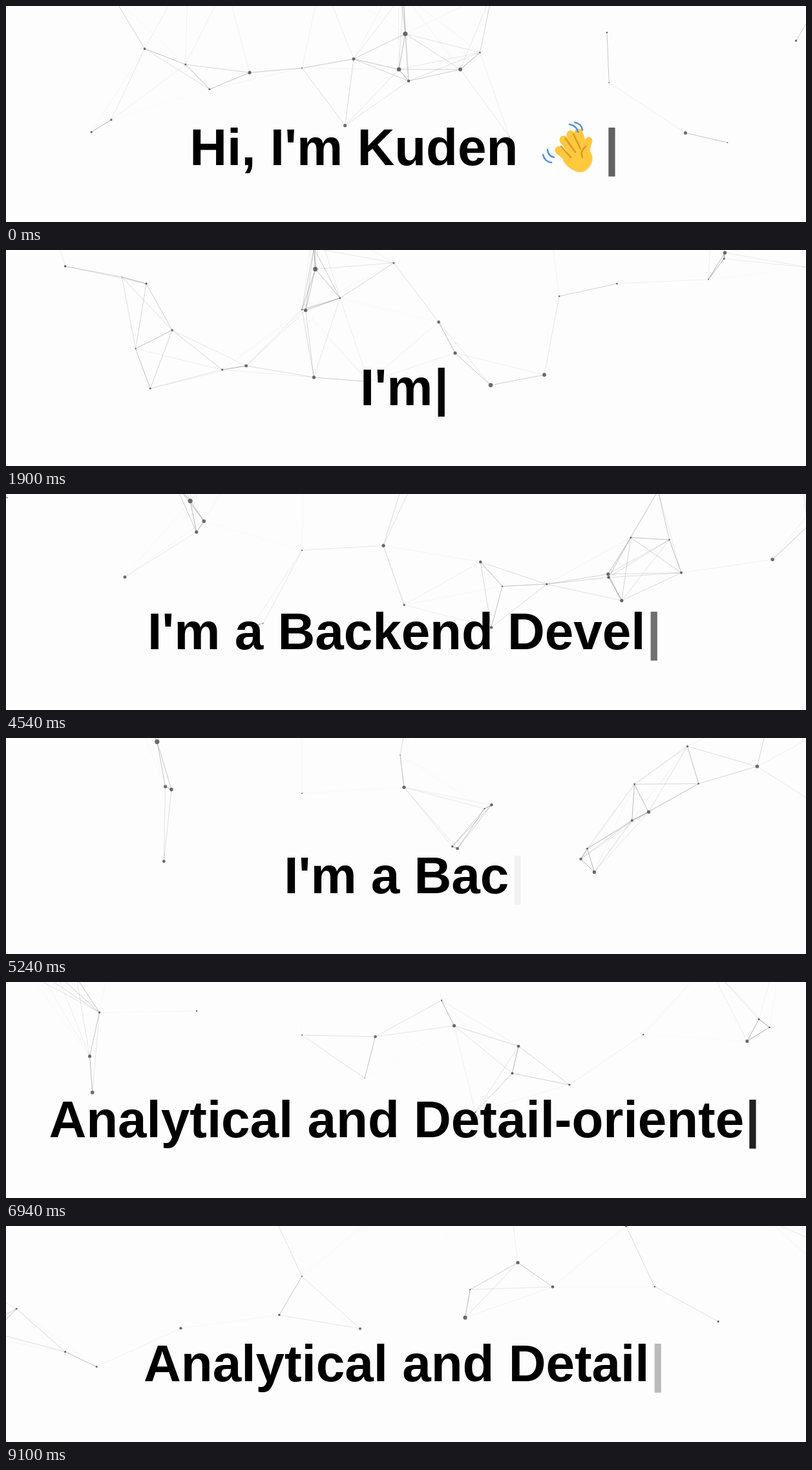
Animation, 1238 px wide and 334 px high, one loop 9.13 s. Source, as an HTML page with a canvas:

```html
<!DOCTYPE html>
<html lang="en">
<head>
<meta charset="utf-8">
<title>Typed intro</title>
<style>
  html, body { margin: 0; width: 100%; height: 100%; overflow: hidden; background: #fdfdfd; }
  canvas { position: absolute; left: 0; top: 0; }
  #line {
    position: absolute; left: 0; top: 167px; width: 1233px;
    text-align: center; white-space: pre; color: #000;
    font: 700 80px/92px "Liberation Sans", Arial, sans-serif;
  }
  #line.tall { top: 173px; }
  #cursor { margin-left: 2px; }
  .emoji { display: none; position: relative; width: 109.8px; height: 0; }
  .emoji.on { display: inline-block; }
  .emoji svg { position: absolute; left: 0; top: -72px; }
</style>
</head>
<body>
<canvas id="net" width="1238" height="262"></canvas>
<div id="line"><span id="text"></span><span class="emoji" id="wave"><svg width="110" height="90" fill="none" stroke-linecap="round">
  <g stroke="#ffc83d" stroke-width="13">
    <path d="M42 49L64 68M49 33L68 58M60 25L76 54M72 22L82 52"/>
    <path d="M88 34Q83 46 84 62" stroke-width="11"/>
  </g>
  <path d="M53 60Q66 42 84 46Q96 54 93 66Q88 83 73 83Q57 80 48 65Z" fill="#ffc83d"/>
  <g stroke="#d99a2b" stroke-width="2.6">
    <path d="M45 43L60 60M52 31L67 52M64 24L75 47"/>
    <path d="M83 43Q74 51 78 60"/>
  </g>
  <g stroke="#5590ea" stroke-width="2.6">
    <path d="M58 9Q69 11 71 21M66 6Q77 8 78 18"/>
    <path d="M24 48Q25 58 34 60M17 56Q20 67 30 68"/>
  </g>
</svg></span><span class="emoji" id="coder"><svg width="110" height="90">
  <rect x="38" y="10" width="34" height="38" rx="15" fill="#ffc83d"/>
  <path d="M35 25Q34 15 41 10Q46 4 57 5Q68 5 71 11Q76 16 73 25L69 20Q62 15 54 18Q45 19 40 20Z" fill="#f79b34"/>
  <path d="M44 23Q47 20 50 22M60 22Q63 20 66 23" fill="none" stroke="#b5651d" stroke-width="2"/>
  <circle cx="47.5" cy="28" r="2.2" fill="#4a3b30"/>
  <circle cx="62.5" cy="28" r="2.2" fill="#4a3b30"/>
  <path d="M49 36Q55 38 61 36Q59 42 55 42Q51 42 49 36Z" fill="#c4302b"/>
  <path d="M15 83Q15 72 26 72V83ZM94 83Q94 72 83 72V83Z" fill="#ffc83d"/>
  <rect x="23.5" y="44" width="62" height="39" rx="3" fill="#929292"/>
  <rect x="50.5" y="59" width="8" height="8" fill="#454552"/>
</svg></span><span id="cursor">|</span></div>
<script>
const LOOP = 9130, TYPE = 33, ERASE = 70, REACH = 165;
const $ = id => document.getElementById(id);
const ctx = $("net").getContext("2d");

// start: first key press, erase: end of the pause
const words = [
  { text: "Hi, I'm Kuden ", emoji: "wave", start: -2000, erase: 650 },
  { text: "I'm a Backend Developer ", emoji: "coder", start: 1791, erase: 4116 },
  { text: "Analytical and Detail-oriented", start: 5966, erase: 8456 }
];

let seed = 11;
const rand = () => (seed = (seed * 16807) % 2147483647) / 2147483647;
const spread = (from, to) => from + rand() * (to - from);
const wrap = (v, from, to) => from + (((v - from) % (to - from)) + to - from) % (to - from);

// the field reaches past the stage on three sides
const field = { left: -100, right: 1340, top: -330, bottom: 225 };

// the dots that stay longest: x, y, vx, vy (px and px/s), largest first
const dots = [
  [618, 43, -73.3, -7.1],
  [608, 98, 74.7, 58.4],
  [703, 98, 68.4, 50],
  [377, 103, 45.6, -5.1],
  [623, 116, 24.5, -2.4],
  [1540, 85, -109, 8.1],
  [132, 195, 106.6, -5.2],
  [930, 41, 8.1, 5.8],
  [458, 96, 0, -2]
].map(([x, y, vx, vy], i) => ({ x, y, vx, vy, r: 3.6 - i * 0.32 }));

for (let i = 0; i < 42; i++) {
  dots.push({
    x: spread(field.left, field.right), y: spread(field.top, field.bottom),
    vx: spread(-90, 90), vy: spread(-90, 90),
    r: 0.7 + 2.6 * rand() ** 1.5, wraps: true
  });
}

function place({ x, y, vx, vy, r, wraps }, t) {
  const px = x + vx * t, py = y + vy * t;
  return wraps
    ? { x: wrap(px, field.left, field.right), y: wrap(py, field.top, field.bottom), r }
    : { x: px, y: py, r };
}

function drawNet(t) {
  const now = dots.map(d => place(d, t)).filter(p => p.y < 262);
  ctx.clearRect(0, 0, 1238, 262);
  ctx.fillStyle = "#6c6c6c";
  for (const p of now) {
    ctx.beginPath();
    ctx.arc(p.x, p.y, p.r, 0, 7);
    ctx.fill();
  }
  now.forEach((a, i) => {
    for (const b of now.slice(i + 1)) {
      const d = Math.hypot(a.x - b.x, a.y - b.y);
      if (d >= REACH) continue;
      ctx.strokeStyle = `rgba(90,90,94,${0.6 * (1 - d / REACH)})`;
      ctx.beginPath();
      ctx.moveTo(a.x, a.y);
      ctx.lineTo(b.x, b.y);
      ctx.stroke();
    }
  });
}

function drawText(ms) {
  const word = words.filter(w => ms >= w.start).pop();
  const size = word.text.length + (word.emoji ? 1 : 0);
  const typed = Math.min(size, Math.floor((ms - word.start) / TYPE));
  const erased = Math.max(0, Math.floor((ms - word.erase) / ERASE));
  const count = Math.max(0, typed - erased);
  const full = Boolean(word.emoji) && count === size;
  $("text").textContent = word.text.slice(0, count);
  $("line").classList.toggle("tall", full);
  for (const id of ["wave", "coder"]) $(id).classList.toggle("on", full && word.emoji === id);
}

const blink = $("cursor").animate(
  [{ opacity: 1, easing: "ease" }, { opacity: 0, easing: "ease" }, { opacity: 1 }],
  { duration: 1000, iterations: Infinity }
);
blink.pause();

function frame() {
  const ms = performance.now() % LOOP;
  drawNet(ms / 1000);
  drawText(ms);
  blink.currentTime = ms + 120;
  requestAnimationFrame(frame);
}
frame();
</script>
</body>
</html>
```
